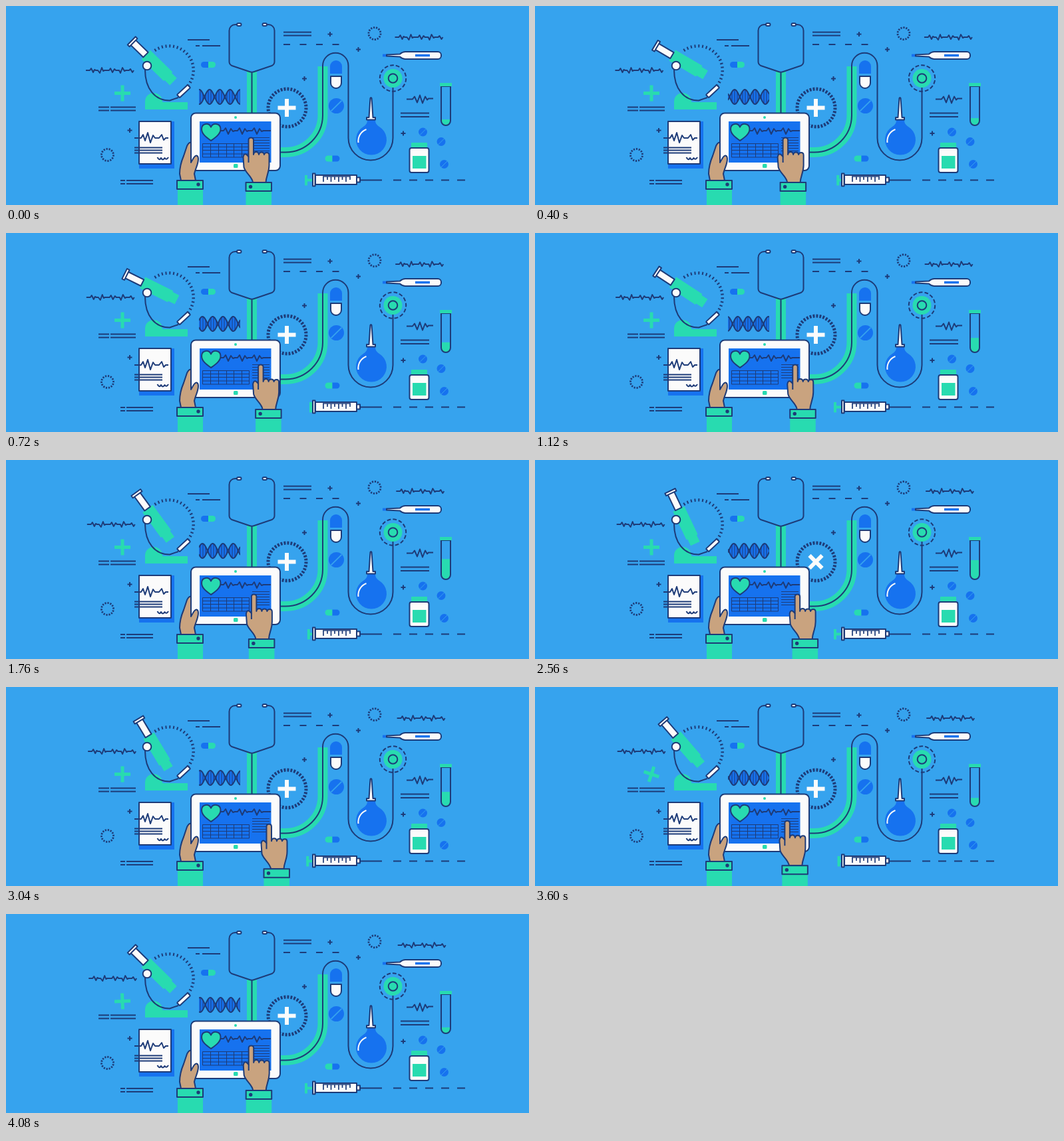
An HTML page that plays this animation: 786 px wide and 300 px high, repeating every 4.16 s.

```html
<!DOCTYPE html>
<html lang="en">
<head>
<meta charset="utf-8">
<title>Medical technology</title>
<style>
  html, body { margin: 0; width: 100%; height: 100%; overflow: hidden; background: #36a3ee; }
  svg { display: block; width: 786px; height: 300px; }
  .n { stroke: #1d3b78; stroke-width: 2; fill: none; stroke-linejoin: round; }
  .thin { stroke-width: 1; }
  .w { fill: #fbfbfb; }
  .g { fill: #28dbb0; }
  .b { fill: #1672ef; }
  .s { fill: #c9a37f; }
  .dot { fill: #1d3b78; }
</style>
</head>
<body>
<svg viewBox="0 0 786 300">
  <defs>
    <path id="pulse" d="M0 0h6l2-3 3 6 2-4 2 1h3l3 4 3-8 2 5 2-1h7l2-3 3 6 3-5 2 2h5l2 4 3-8 3 5 2-1h5l2-2 3 5 2-3"/>
    <clipPath id="tubeClip"><path d="M654 121h14v52a7 7 0 0 1-14 0z"/></clipPath>
    <clipPath id="dnaClip"><path d="M290 123h62v28h-62z"/></clipPath>
    <g id="capsule"><path class="g" d="M11 0H4.500a4.500 4.500 0 0 0 0 9H11z"/><path class="b" d="M11 0h6.500a4.500 4.500 0 0 1 0 9H11z"/></g>
    <g id="tablet"><circle class="b" r="6.500"/><path d="M-4.500 4.500l9-9" stroke="#36a3ee"/></g>
    <path id="plus" d="M-3.500 0h7M0-3.500v7"/>
  </defs>

  <!-- scattered lines and plus signs -->
  <g class="n">
    <path d="M273 51h33M285 60h6M295 60h27M417 39.500h42M417 44.500h42M139 152.500h16M157 152.500h38M139 157.500h16M157 157.500h38M172 263h7M181 263h40M172 268h7M181 268h40M593 161.500h43M593 167h43"/>
    <path d="M417 58h84" stroke-dasharray="10 14.500"/>
    <path d="M602 140.500h9l3-4 4 9 4-11 4 12 4-10 3 5 2-2h7"/>
    <use href="#plus" x="487" y="42.500"/><use href="#plus" x="529.500" y="65.500"/><use href="#plus" x="448.500" y="109.500"/>
    <use href="#plus" x="186" y="187.500"/><use href="#plus" x="597" y="192"/>
    <use id="pulseA" href="#pulse" y="97"/>
    <use id="pulseB" href="#pulse" y="47"/>
    <g stroke-width="2.800">
      <circle id="dotsA" cx="554" cy="41.500" r="9" pathLength="28" stroke-dasharray="1.100 .9"/>
      <circle id="dotsB" cx="152.500" cy="224.500" r="9" pathLength="28" stroke-dasharray="1.100 .9"/>
    </g>
  </g>
  <path id="greenPlus" d="M163 131.500h24M175 119.500v24" stroke="#28dbb0" stroke-width="5"/>

  <!-- pills -->
  <use href="#capsule" transform="translate(315 93) rotate(180)"/><use href="#capsule" x="479.500" y="225.500"/>
  <path class="b" d="M487 102v-11a9 9 0 0 1 18 0v11z"/>
  <path class="n w" d="M488 106h16v10a8 8 0 0 1-16 0z"/>
  <use href="#tablet" transform="translate(496.500 150.500) scale(1.770)"/>
  <use href="#tablet" x="626.500" y="190"/><use href="#tablet" x="654" y="204.500"/><use href="#tablet" x="658.500" y="238.500"/>

  <!-- microscope -->
  <path id="ticks" class="n"/>
  <path class="g" d="M209 156v-12a13 13 0 0 1 26 0v1h38v11z"/>
  <path class="n" d="M209 96C209 125 224 142.500 246 142.500L259 138"/>
  <rect class="n w" x="-11" y="-3" width="22" height="6" rx="1" transform="translate(267 128.500) rotate(-43)"/>
  <g id="scope">
    <path class="g" d="M-13-20h47v2h11v15h-11v2h-47z"/>
    <path class="n w" d="M-39-15.500h26v10.500h-26zM-43-19h4v17h-4z"/>
  </g>
  <circle class="n w" cx="212" cy="90" r="6.300"/>

  <!-- helix -->
  <g clip-path="url(#dnaClip)">
    <path id="dnaFill" class="b"/>
    <path id="dnaRungs" class="n thin"/>
    <path id="dnaStrands" class="n"/>
  </g>

  <!-- stethoscope -->
  <path d="M369.500 99V164M476 91V165A56 56 0 0 1 420 220.500H408" fill="none" stroke="#28dbb0" stroke-width="15"/>
  <path class="n" d="M347 28h-2.500a9 9 0 0 0-9 9v47q0 4 4 6l26.500 9q3.500 1.500 7 0l26.500-9q4-2 4-6V37a9 9 0 0 0-9-9h-2.500M369.500 100V162"/>
  <rect class="n w" x="347" y="26" width="6.500" height="4" rx="2"/><rect class="n w" x="385.500" y="26" width="6.500" height="4" rx="2"/>
  <path class="n" d="M408 220.500H420A56 56 0 0 0 476 165V90A19.250 19.250 0 0 1 514.500 90V199A33.500 33.500 0 0 0 581.500 199V110"/>
  <circle class="g" cx="581.500" cy="109" r="14"/>
  <circle class="n g" cx="581.500" cy="109" r="6.800"/>
  <circle id="chest" class="n" cx="581.500" cy="109" r="19.700" pathLength="70" stroke-dasharray="3.300 1.700"/>

  <!-- badge -->
  <circle cx="422.500" cy="153.500" r="28.500" class="n" style="stroke-width:5" pathLength="72" stroke-dasharray="1.150 .85"/>
  <path id="whitePlus" d="M408.500 153.500h27M422 140v27" stroke="#fbfbfb" stroke-width="6"/>

  <!-- bulb -->
  <path class="b" d="M543 172h12c0 5 2 7 6 10a23 23 0 1 1-24 0c4-3 6-5 6-10z"/>
  <path d="M529.500 206c-1-9 4-17 12-20" fill="none" stroke="#fbfbfb" stroke-width="2"/>
  <path class="n w" d="M547.500 139q1-2 2 0l2 29h3.500v3.500h-13v-3.500h3.500z"/>

  <!-- thermometer -->
  <path d="M566 74.500h7" stroke="#1672ef" stroke-width="4"/>
  <path class="n w" d="M572 73.500l20-1q4-3.500 8-3.500h49a5 5 0 0 1 5 5v1a5 5 0 0 1-5 5h-49q-4 0-8-3.500l-20-1z"/>
  <path d="M615 74.500h22" stroke="#1672ef" stroke-width="3.500"/>

  <!-- test tube -->
  <rect id="liquid" class="g" x="654" width="14" height="40" clip-path="url(#tubeClip)"/>
  <path class="n" d="M654 121v52a7 7 0 0 0 14 0v-52z"/>
  <path class="g" d="M652 116h18v5h-18z"/>

  <!-- bottle -->
  <rect class="g" x="609" y="206" width="24" height="8" rx="1"/>
  <rect class="n w" x="606.500" y="214" width="29" height="37" rx="3"/>
  <path class="g" d="M611 226h20.500v19h-20.500z"/>

  <!-- syringe -->
  <path id="plunger" class="g" d="M449 255h4v5.500h14v4h-14v6h-4z"/>
  <path class="n w" d="M461 252.500h3.500v19h-3.500zM465 255h62v14h-62zM527 258.500h5v7h-5z"/>
  <path class="n" style="stroke-width:1.700" d="M476 257h42M477 257v8M483 257v5M488.500 257v8M494 257v5M500 257v8M505.500 257v5M511 257v8M517 257v5"/>
  <path class="n" d="M532 262.500h33"/><path class="n" d="M582 262.500h108" stroke-dasharray="12"/>

  <!-- report -->
  <path class="b" d="M205 174h48v71h-53v-10z"/>
  <path class="n w" d="M200 174h48v64h-48z"/>
  <path class="n" d="M193 199h10l3-5 3 9 4-12 4 15 4-11 3 4h6l4-5 3 8 3-3h4M193 213.500h42M193 217.500h42M193 221.500h42M227.500 228q3 6 5.500 1 2.500 5 5.500 0 2.500 4 5.500-1"/>

  <!-- tablet computer -->
  <rect class="n w" x="278" y="161.500" width="134" height="86.500" rx="7"/>
  <path class="b" d="M291 174h107.500v62h-107.500z"/>
  <circle class="g" cx="345" cy="168" r="2"/><rect class="g" x="342" y="238" width="6.500" height="6" rx="1.500"/>
  <path class="n" d="M322 188h5l3-4 4 9 4-8 3 4 3-1h4l3-4 4 9 4-8 3 4 2-1h6l3-4 4 9 4-8 3 4 3-1h11"/>
  <path class="n thin" d="M295.500 207.500h70v20.500h-70zM295.500 212.500h70M295.500 217.500h70M295.500 223h70M307.500 207v21M319.500 207v21M331.500 207v21M342.500 207v21M354.500 207v21M370 198.500h26M370 202.500h26M370 206.500h26M370 210.500h26M370 214.500h26M370 218.500h26"/>
  <path class="n g" d="M308 203C301 198 294 193 294 185.500C294 177 304.500 175 308 182.500C311.500 175 322.500 177 322.500 185.500C322.500 193 315 198 308 203z"/>

  <!-- hands -->
  <path class="n s" d="M263 263L261 253C261 243 264 233 267 226L272 211Q275 205 278 206V236C281 231 283 225.500 286 225.500C289 225.500 289.500 230 288.500 235C287 243 284 247 283 253L285 263z"/>
  <path class="g" d="M258 276h38v24h-38z"/><path class="n g" d="M257 263h39v13h-39z"/><circle class="dot" cx="289" cy="269" r="2.700"/>
  <g id="hand">
    <path class="n s" d="M371 266C370 257 360 252 357.500 243L356.500 228Q357.500 221.500 361.500 224L364.500 227V202Q364.500 198.500 368.200 198.500T372 202V224Q372.500 220 376 220T380 224Q380.500 220.500 384 220.500T388 224Q388.500 221 392 221T395.500 225V240C395.500 251 391 256 390.500 266z"/>
    <path class="n" d="M364.500 227v9"/>
    <path class="g" d="M360.500 279h38.500v40h-38.500z"/><path class="n g" d="M360.500 266h38.500v13h-38.500z"/><circle class="dot" cx="367.500" cy="272.500" r="2.700"/>
  </g>
</svg>
<script>
const LOOP = 4160, STEP = 80;
const el = id => document.getElementById(id);
const set = (id, name, value) => el(id).setAttribute(name, value);
const turn = (id, deg, x, y) => set(id, 'transform', `rotate(${deg} ${x} ${y})`);
const smooth = p => (1 - Math.cos(Math.PI * p)) / 2;
const linear = p => p;

// keys: [time, value] pairs
function track(keys, t, ease = smooth) {
  const i = Math.max(1, keys.findIndex(k => k[0] >= t));
  const [t0, v0] = keys[i - 1], [t1, v1] = keys[i];
  return v0 + (v1 - v0) * ease((t - t0) / (t1 - t0));
}

// scale marks around the upper right of the microscope
function drawTicks() {
  let d = '';
  for (let deg = -124; deg <= 38; deg += 9) {
    const a = deg * Math.PI / 180, c = Math.cos(a), s = Math.sin(a);
    d += `M${245 + 34.5 * c} ${97 + 34.5 * s}L${245 + 39 * c} ${97 + 39 * s}`;
  }
  set('ticks', 'd', d);
}

function drawHelix(p) {
  const half = 15.4, top = [], bottom = [];
  let rungs = '';
  for (let x = 290; x <= 352; x++) {
    const y = 11 * Math.sin(Math.PI * ((x - 290.5) / half - p));
    top.push(`${x} ${137 - y}`);
    bottom.push(`${x} ${137 + y}`);
    if (x % 4 === 0) rungs += `M${x} ${137 - y}V${137 + y}`;
  }
  set('dnaFill', 'd', 'M' + top.join('L') + 'L' + bottom.slice().reverse().join('L') + 'z');
  set('dnaRungs', 'd', rungs);
  set('dnaStrands', 'd', 'M' + top.join('L') + 'M' + bottom.join('L'));
}

function draw(t) {
  const p = t / LOOP;
  const angle = track([[0, 44.5], [600, 26], [2400, 65], [LOOP, 44.5]], t);
  set('scope', 'transform', `translate(212 90) rotate(${angle})`);

  const drift = 4.3 * p;
  set('pulseA', 'x', 120 + drift);
  set('pulseB', 'x', 584.5 + drift);

  turn('dotsA', 90 * p, 554, 41.5);
  turn('dotsB', 90 * p, 152.5, 224.5);
  turn('chest', 90 * p, 581.5, 109);
  turn('whitePlus', track([[0, 0], [2080, 0], [3040, 90], [LOOP, 90]], t), 422, 153.5);
  turn('greenPlus', track([[0, 0], [3360, 0], [LOOP, 90]], t), 175, 131.5);

  drawHelix(0.5 - 4 * p);
  set('liquid', 'y', track([[0, 171], [2080, 148], [LOOP, 171]], t));

  const push = track([[0, 0], [700, 7], [1120, 0], [1400, 0]], t % (LOOP / 3));
  set('plunger', 'transform', `translate(${push})`);

  const x = track([[0, 0], [1280, 26], [1680, 2], [2480, 26], [3040, 27], [3960, 0.5], [LOOP, 0]], t, linear);
  const y = track([[0, 0], [1280, 0], [1680, 4], [2560, 4], [2960, 9], [3960, 0], [LOOP, 0]], t, linear);
  set('hand', 'transform', `translate(${x} ${y})`);
}

const start = performance.now();
function tick() {
  const t = (performance.now() - start) % LOOP;
  draw(Math.floor(t / STEP) * STEP);
  requestAnimationFrame(tick);
}
drawTicks();
draw(0);
requestAnimationFrame(tick);
</script>
</body>
</html>
```
